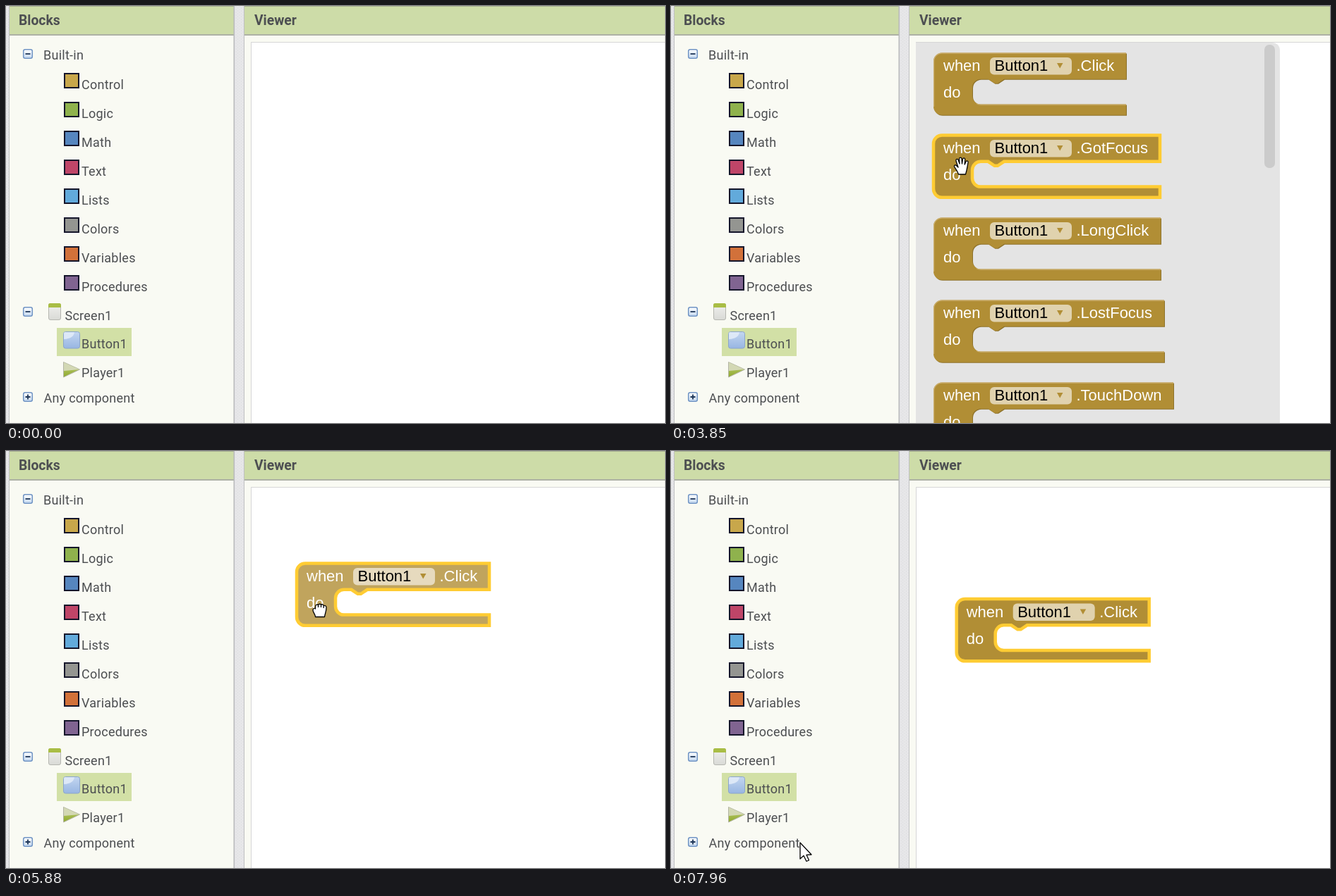
These frames come from a looping animation (934 by 592 pixels, 8 s). An HTML page:

```html
<!DOCTYPE html>
<html lang="en">
<head>
<meta charset="utf-8">
<title>Dragging an event block</title>
<style>
  html, body { margin: 0; width: 100%; height: 100%; overflow: hidden; background: #e6e6e8; }
  svg { display: block; width: 934px; height: 592px; }
  .head { font: 700 19.3px Roboto, sans-serif; fill: #4d4f52; }
  .item { font: 400 18px Roboto, sans-serif; letter-spacing: .25px; fill: #4c4e51; }
  .block text { font: 22px "Liberation Sans", Arial, sans-serif; fill: #fff; }
  .block .name { fill: #000; }
  .body { fill: #b18e35; }
  .dark { fill: #8e722a; }
  .light { fill: none; stroke: #cbb071; stroke-width: 1.3; }
  .selected .body { stroke: #fc3; stroke-width: 4.5; }
  .selected .dark, .selected .light { display: none; }
  .dragging .body { fill-opacity: .8; }
  .cursor path { stroke: #000; stroke-width: 1.3; stroke-linejoin: round; fill: #fff; }
</style>
</head>
<body>
<svg id="stage" viewBox="0 0 934 592" xmlns="http://www.w3.org/2000/svg">
  <defs>
    <pattern id="linen" width="5" height="4" patternUnits="userSpaceOnUse">
      <rect width="5" height="4" fill="#e7e7e9"/>
      <path d="M1 0v2M3.5 2v2" stroke="#dfdfe2"/>
    </pattern>
    <linearGradient id="blue" x2="0" y2="1">
      <stop stop-color="#c3d6f0"/><stop offset="1" stop-color="#98b6e2"/>
    </linearGradient>
    <linearGradient id="grey" x2="0" y2="1">
      <stop stop-color="#f0f0ee"/><stop offset="1" stop-color="#d9dad6"/>
    </linearGradient>
    <linearGradient id="green" x2="0" y2="1">
      <stop stop-color="#c3d27c"/><stop offset="1" stop-color="#8fa92c"/>
    </linearGradient>
    <linearGradient id="toggle" x2="0" y2="1">
      <stop stop-color="#fff"/><stop offset="1" stop-color="#c4d8f0"/>
    </linearGradient>
  </defs>

  <rect width="934" height="592" fill="url(#linen)"/>
  <rect x="4" width="320" height="592" fill="#f9faf3"/>
  <rect x="337" width="597" height="592" fill="#f9faf3"/>
  <path d="M4 0H323V41H4ZM338 0H934V41H338Z" fill="#cddca8"/>
  <path d="M4 .5H323M338 .5H934" stroke="#a5ad92"/>
  <path d="M5 41H323M338 41H934" stroke="#adb1a5" stroke-width="2"/>
  <path d="M4.5 0V592M337.5 0V592" stroke="#bfc0c2"/>
  <path d="M323.3 0V592" stroke="#b9babc" stroke-width="1.6"/>
  <rect x="347.5" y="51.5" width="600" height="560" fill="#fff" stroke="#d6d6d6"/>
  <text class="head" x="18" y="27">Blocks</text>
  <text class="head" x="352" y="27">Viewer</text>

  <g id="tree"></g>
  <g id="flyout">
    <path d="M347 52H851Q863 52 863 64V592H347Z" fill="#e4e4e4"/>
    <rect x="841" y="55" width="15" height="175" rx="7" fill="#cbcbcb"/>
  </g>
  <g id="work"></g>
  <g class="cursor" id="cursor">
    <path d="M0 0V23L5 18.5L9 26.5L12.5 25L9 17.3L16 17Z"/>
    <path d="M-4.5 14C-6 9 -9 6 -10.5 3C-11 .5 -8.5 0 -7 2L-5 4L-8 -5C-8.5 -8 -5.5 -8.5 -4.7 -6L-3 -1L-3.5 -8C-3.5 -10.5 -.3 -10.5 0 -8L.5 -1L1.5 -7.5C2 -10 5 -9.5 4.7 -7L4.2 0L6 -4C7 -6 9.8 -5 9 -2.5C8 3 7.5 8 5.5 14Z"/>
    <path d="M-6 9.5C-6 6 -9.5 3 -9.5 0C-9.5 -3 -7 -3 -6 -2V-5C-6 -8.5 -2.5 -8.5 -2 -7C-1 -9.5 1.5 -9 2 -7.5C3.5 -9 5.5 -8 5.7 -6C7.5 -7.5 9.5 -6 9.5 -4C9.5 2 7.5 5 7 9.5ZM-2 -7V-4M2 -7.5V-4M5.7 -6V-3"/>
  </g>
</svg>
<script>
const LOOP = 8000;
const $ = id => document.getElementById(id);
const NS = 'http://www.w3.org/2000/svg';

function group(parent, cls, markup) {
  const g = document.createElementNS(NS, 'g');
  g.setAttribute('class', cls);
  g.innerHTML = markup;
  parent.appendChild(g);
  return g;
}

// Component tree
const label = (x, y, text) => `<text class="item" x="${x}" y="${y}">${text}</text>`;
const toggle = (y, plus) =>
  `<rect x="24.7" y="${y - 5.8}" width="12.6" height="12.6" rx="2.5" fill="url(#toggle)" stroke="#7094c4" stroke-width="1.5"/>
   <path d="M27.5 ${y + .5}h7${plus ? `M31 ${y - 3}v7` : ''}" stroke="#1d3557" stroke-width="1.8"/>`;
const drawers = [
  ['Control', '#c8a74b'], ['Logic', '#8fb24d'], ['Math', '#5686bf'], ['Text', '#bf4568'],
  ['Lists', '#62aadb'], ['Colors', '#949591'], ['Variables', '#d2713a'], ['Procedures', '#806491']
];
group($('tree'), 'tree',
  toggle(67.5) + label(53, 76, 'Built-in') +
  drawers.map(([name, fill], i) =>
    `<rect x="83" y="${96 + 41 * i}" width="20" height="20" fill="${fill}" stroke="#14152a" stroke-width="2"/>` +
    label(107, 118 + 41 * i, name)).join('') +
  toggle(433.5) +
  `<rect x="60.5" y="422.5" width="17" height="23" rx="2.5" fill="url(#grey)" stroke="#b5b6b0"/>
   <path d="M60 428V424.5Q60 422 62.5 422H75.5Q78 422 78 424.5V428Z" fill="#a9bd45"/>` +
  label(83.5, 446, 'Screen1') +
  `<rect x="72" y="457" width="106" height="40" fill="#d2e0a6"/>
   <rect x="81.5" y="462.5" width="23" height="23.5" rx="3" fill="url(#blue)" stroke="#8ba5cc"/>
   <path d="M82 473V465Q82 463 84 463H97Q96 472 82 473Z" fill="#dde8f7"/>` +
  label(107, 486, 'Button1') +
  `<path d="M81.5 505.5L104.5 516L81.5 527Z" fill="url(#green)" stroke="#b3b5a6"/>
   <path d="M82 506L104 516L82 518Z" fill="#d3d8b4"/>` +
  label(107, 527, 'Player1') +
  toggle(554.5, true) + label(53.5, 563, 'Any component'));

// Event blocks, each drawn in the place of the first one and then shifted
function blockMarkup(event, right) {
  const d = `M384 66.5H${right}V103.8H472l-9 6h-4.5l-9 -6H439a12 12 0 0 0 -12 12V127.6a12 12 0 0 0 12 12H${right}V154.8H384a12 12 0 0 1 -12 -12V78.5a12 12 0 0 1 12 -12Z`;
  return `<path class="dark" d="${d}" transform="translate(1 1)"/><path class="body" d="${d}"/>
    <path class="light" d="M372.6 143V78.5a11.5 11.5 0 0 1 11.5 -11.5H${right}M433 138.5Q436 140.2 439 140.2H${right}"/>
    <text x="386" y="92">when</text><text x="386" y="130">do</text>
    <rect x="452" y="73" width="116" height="24.5" rx="6" fill="#fff" fill-opacity=".6"/>
    <text class="name" x="458.5" y="92">Button1</text>
    <path d="M547 81H555.5L551.2 88.5Z" fill="#b18e35"/>
    <text x="574.5" y="92">.${event}</text>`;
}
const events = [['Click', 645], ['GotFocus', 693], ['LongClick', 694], ['LostFocus', 699], ['TouchDown', 712]];
const PITCH = 117;
const shelf = events.map(([name, right], i) => {
  const g = group($('flyout'), 'block', blockMarkup(name, right));
  g.setAttribute('transform', `translate(0 ${PITCH * i})`);
  return g;
});
const dragged = group($('work'), 'block selected', blockMarkup(...events[0]));

// Pointer: bursts of stepped movement [start, end, steps] over a path of [time, x, y]
const bursts = [
  [670, 890, 4], [1060, 1820, 11], [3380, 3680, 5], [3850, 4240, 6],
  [4790, 5560, 11], [5650, 6340, 10], [7590, 7590, 1], [7740, 7960, 4]
];
const GRAB = [404.5, 133];
const held = (t, dx, dy) => [t, GRAB[0] + dx, GRAB[1] + dy];
const path = [
  [670, 673, 551], [740, 540, 505], [820, 400, 470], [890, 309, 455],
  [1060, 303, 457], [1440, 195, 472], [1600, 160, 477], [1820, 146, 478],
  [3380, 160, 468], [3530, 310, 310], [3605, 380, 255], [3680, 413, 232],
  [3850, 412, 225], [4010, 408, 185], held(4240, 0, 0),
  held(4790, 6, 4), held(4944, 38, 29), held(5021, 56, 46), held(5250, 84, 80), held(5560, 62, 96),
  held(5650, 56, 95), held(5880, 40, 93), held(6110, 35, 120), held(6340, 32.7, 143.5),
  [7590, 731, 304], [7740, 600, 368], [7960, 183, 556]
];

function snap(t) {
  let at = 0;
  for (const [start, end, n] of bursts) {
    if (t < start) break;
    if (t >= end) { at = end; continue; }
    const dt = (end - start) / (n - 1);
    at = start + dt * Math.floor((t - start) / dt + 1e-6);
  }
  return at;
}

function place(t) {
  const i = path.findIndex(p => p[0] >= t);
  if (i <= 0) return path[0].slice(1);
  const [t0, x0, y0] = path[i - 1], [t1, x1, y1] = path[i];
  const u = (t - t0) / (t1 - t0);
  return [x0 + (x1 - x0) * u, y0 + (y1 - y0) * u];
}

const show = (el, on) => el.style.display = on ? '' : 'none';

function draw(t) {
  const at = snap(t), [x, y] = place(at);
  const open = t >= 2750 && at < 5000;
  const gripping = t >= 4390 && t < 6810;
  const over = !open ? -1 : t >= 4390 ? 0 : events.findIndex(([, right], i) =>
    x > 372 && x < right && y > 66 + PITCH * i && y < 156 + PITCH * i);

  show($('flyout'), open);
  shelf.forEach((g, i) => g.classList.toggle('selected', i === over));

  show(dragged, at >= 5000);
  const [bx, by] = place(Math.min(at, 6340));
  dragged.setAttribute('transform', `translate(${bx - GRAB[0]} ${by - GRAB[1]})`);
  dragged.classList.toggle('dragging', t < 6720);

  const hand = over >= 0 || (t >= 6810 && t < 7590);
  const shape = gripping ? 2 : hand ? 1 : 0;
  const cursor = $('cursor');
  show(cursor, t >= 670);
  [...cursor.children].forEach((el, i) => show(el, i === shape));
  cursor.setAttribute('transform', `translate(${x} ${y})`);
}

const begin = performance.now();
function tick() {
  draw((performance.now() - begin) % LOOP);
  requestAnimationFrame(tick);
}
tick();
</script>
</body>
</html>
```
